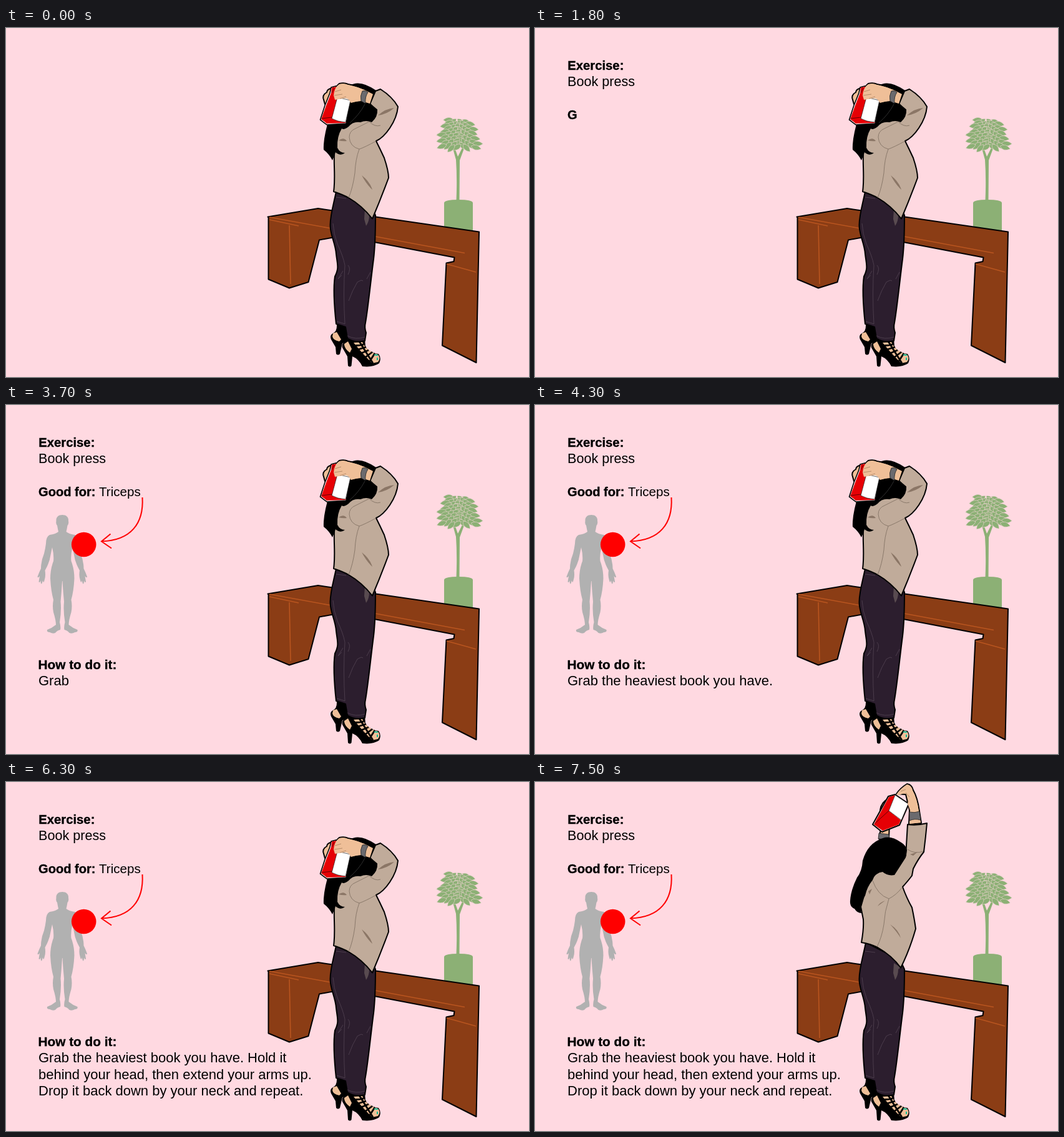
Animation of 838x559 px, one loop 8 s. Source, as an HTML page:

```html
<!DOCTYPE html>
<html lang="en">
<head>
<meta charset="utf-8">
<title>Book press</title>
<style>
html,body{margin:0;width:100%;height:100%;overflow:hidden;background:#ffd9e1}
svg{display:block;width:100vw;height:100vh}
text{font-family:"Liberation Sans",Arial,sans-serif}
.bold{font-weight:700;stroke:#000;stroke-width:.35}
.ink{stroke:#000;stroke-width:2;stroke-linejoin:round}
.thin{fill:none;stroke:#7d6c5f;stroke-width:.8}
.fold{fill:#8b7666}
.skin{fill:#efbf98}
.shirt{fill:#c0ab9a}
.red{fill:#e60005}
.watch{fill:#6b6a6e;stroke:#222;stroke-width:.8}
</style>
</head>
<body>
<svg viewBox="0 0 838 559">
<defs>
  <path id="half" d="M91 176C83 176 80 180 80.500 186Q79.500 190 82 193Q83 199 84 203Q79 207 70 208Q64 211 64 222Q63 230 61 238Q56 250 56 262Q53 268 50.500 275Q51 278 54 274L52.500 283Q54 286 55.500 281Q55.500 288 57.500 286L59 281Q60 287 61.500 281Q64 274 62.500 265Q70 252 71.500 240L74 228Q77 240 76 250Q71 263 71 278Q72 298 76 312Q74 322 76 332Q80 345 80 352Q74 357 66 360Q65 364 70 364Q75 367 79 365Q82 361 87 360Q88 355 86 348Q89 330 87.500 315Q89 300 90 282H91Z"/>
  <g id="base">
    <path class="ink" fill="#8b3d15" d="M419.500 302.500L500 289L758 326.500L753.500 536L699 508.500L705.500 376.500L717.500 374L718.500 367.500L593 343.500L524 335.500L502 339.500L484.500 407L454 416.500L420.500 402.500V303Z"/>
    <path fill="none" stroke="#b9551f" stroke-width="1.600" d="M422 303L521 321M422 307L469 317M454 316L456 410M592 334L735 360.500M706 378L753 391"/>
    <path d="M530 470L545 475L548 502L539 505L535 522Q532 525 529 522L528 511L521 499Q518 492 524 489Q530 486 530 477Z"/>
    <path class="skin" d="M524 489L530 487L537 499L534 502Q524 500 523 494Z"/>
    <path d="M549 492L575 498L576 511Q583 520 597 522Q602 529 598 537Q588 544 571 542Q565 530 555 526L553.500 541Q551 544 548 541L547 526L539 512Q537 503 546 502Z"/>
    <path class="skin" d="M542 506L548 502L554 514L551 520Q542 514 542 506Z"/>
    <path class="skin" d="M557 504L571 503Q577 517 596 523Q601 529 596 535L587 537Q573 524 557 504Z"/>
    <path fill="none" stroke="#000" stroke-width="2.800" d="M559 509L573 507M564 515L577 511M569 521L581 516M575 528L587 519M582 535L591 521M566 502L588 537"/>
    <path fill="none" stroke="#12bd98" stroke-width="2" d="M590 523.500L596 524M595 528V532"/>
    <path class="ink" fill="#2c1e2e" d="M530 257C526 279 519.500 297 519.500 316C519.500 332 528 345 529 362C531 380 534 384 527 398C524 418 526 447 529 474L544 479L547 497Q560 505 575 501L577 488Q574 480 576 472C580 450 585 400 589 370C592 345 592 320 592 300L585 285Z"/>
    <path fill="none" stroke="#544453" stroke-width=".8" d="M524 313Q525 330 531 346Q540 365 543 380Q540 425 543 474M529 271L545 273M548 380Q553 385 548 395M540 389L532 402L538 396M549 437Q555 420 563 407L569 404L572 405M578 402L584 391M547 493Q560 500 575 495M530 470L543 474"/>
    <path fill="#594b50" d="M575 290L574 306L577 317Q582 310 582 300L586 297Z"/>
  </g>
</defs>

<g id="plant" fill="#8cb075">
  <path d="M702 280Q703 275 725 275Q747 275 748 280V327H702Z"/>
  <path d="M721.500 277Q723 240 721 211L716 193L719 192L724 206L731 192L734 193L727 212L726.500 277Z"/>
</g>

<g id="down">
  <use href="#base"/>
  <path class="ink shirt" d="M526 203C525 220 528 240 525 262Q540 267 549 272Q570 284 587 305.500Q600 275 613 240Q613 229 606 208Q600 195 593 181C607 175 626 150 628 126Q619 110 600 98L592 101L583 122L594 131L580 142L545 142L528 175Z"/>
  <path d="M551 92Q567 82 593 100L584 121L595 131Q596 142 586 151Q577 147 568 151Q556 149 549 158Q541 164 538 161Q530 174 531 192Q535 200 543 200Q536 206 528 199Q526 205 523 212Q518 202 509 195Q508 180 515 154L538 120Z"/>
  <path class="thin" d="M593 181Q575 191 566 194Q551 190 550 175Q550 165 560 161L582 150Q591 159 600 156M566 194Q560 210 559 232Q556 255 549 272"/>
  <path fill="none" stroke="#444" stroke-width=".7" d="M575 122Q566 139 551 152"/>
  <path class="fold" d="M570 236Q583 246 587 259Q578 251 570 236ZM596 140Q608 129 622 128Q611 138 596 140ZM533 180Q541 174 546 181Q540 182 533 180Z"/>
  <path class="ink skin" d="M523 96Q514 98 514 103Q507 107 508.500 113L511 122L524 112Z"/>
  <path class="ink skin" d="M524 108Q527 94 534 89Q542 87 548 90Q560 92 574 98L588 105L583 122L569 117L553 121L542 114Z"/>
  <path fill="#fff" stroke="#000" stroke-width="1.600" d="M521 95L529 93L552 115L545 153L514 155L503.500 147L511 124L519 104Z"/>
  <path class="red" d="M522 95.500L529 94L533 112L523 143L545 150L544 152L514 153L505 146L513 124L521 104Z"/>
  <path fill="#fff" stroke="#222" stroke-width=".7" d="M531 111L552 116L544 151Q531 150 522 145Z"/>
  <path fill="none" stroke="#400" stroke-width=".8" d="M506 145L522 143M526 96L522 104"/>
  <path class="skin" d="M525 108Q526 95 534 90Q542 88 548 91Q562 94 574 99L588 106L583 121L569 117L552 119Q548 111 540 113L527 115Z"/>
  <path fill="none" stroke="#9c7455" stroke-width=".7" d="M527 102L537 99M526 108L539 106M535 113L545 110"/>
  <path class="watch" d="M571 101Q575 99 580 103Q575 110 576 121L569 117Q567 109 571 101Z"/>
</g>

<g id="up">
  <use href="#base"/>
  <path class="ink skin" d="M566 27Q555 32 553 45L555 70L551 91L567 91L568 65L575 40Z"/>
  <path class="watch" d="M551 82L567 84L568 92L550 91Z"/>
  <path class="ink shirt" d="M597 68Q612 70 628 66Q626 88 623 112Q614 123 606 139L604 150Q598 158 589 168Q596 187 604 201Q608 220 610 235Q600 270 586 297.500Q572 278 549 265Q537 259 523 257Q527 235 526 220L522 200L535 155L557 140L572 146L594 118Z"/>
  <path d="M557 90Q570 85 587 97Q594 101 596 109L594 121Q585 135 576 149Q565 151 557 144Q545 145 541 157Q532 168 529 182Q520 194 523 210Q516 210 512 203Q504 200 505 190Q506 173 516 153Q524 143 525 126Q533 98 557 90Z"/>
  <path class="thin" d="M589 168Q579 181 567 187Q549 181 541 158M567 187Q560 208 559 228Q556 248 548 264M597 108Q609 116 622 111"/>
  <path class="fold" d="M569 228Q583 237 586 250Q580 240 569 228ZM549 199Q552 193 561 190Q554 195 549 199ZM534 175L540 171L536 180ZM601 116L613 112L606 118Z"/>
  <path class="ink skin" d="M579 19Q585 10 596 3Q604 4 606 13Q613 25 616 47L619 66L599 68L600 45L594 20Z"/>
  <path class="ink" fill="#fff" d="M541 68L566 23L577 20L599 35L584 69L556 80Z"/>
  <path class="red" d="M543 68L567 24L577 21L567 46L586 61L583 68L557 78Z"/>
  <path fill="#fff" stroke="#222" stroke-width=".7" d="M577 21L598 35L587 61L567 46Z"/>
  <path fill="none" stroke="#400" stroke-width=".8" d="M567 46L544 67"/>
  <path class="skin" d="M579 20Q585 11 596 4Q603 5 605 14Q612 27 615 47L618 65L600 67L601 45L597 35L599 25L594 17L583 21Z"/>
  <path fill="none" stroke="#9c7455" stroke-width=".7" d="M586 15L594 12M594 17L600 24"/>
  <path class="watch" d="M600 48Q608 50 616 47L618 61Q608 58 600 62Z"/>
</g>

<g id="target">
  <g fill="#b1b1b1"><use href="#half"/><use href="#half" transform="matrix(-1 0 0 1 180.500 0)"/></g>
  <circle cx="124.700" cy="223.500" r="19.800" fill="red"/>
  <path fill="none" stroke="red" stroke-width="2" d="M218.500 148C221 190 200 217 153 218.500M167.500 206.500L153 218.500L169 229.500"/>
</g>
<g id="copy"></g>
</svg>
<script>
const $ = id => document.getElementById(id);

function add(parent, tag, attrs) {
  const el = document.createElementNS("http://www.w3.org/2000/svg", tag);
  for (const k in attrs) el.setAttribute(k, attrs[k]);
  return parent.appendChild(el);
}

// Foliage: overlapping leaves fanned out over a dome
const leaves = 64;
for (let i = 0; i < leaves; i++) {
  const v = (i + .5) / leaves, u = (i * .618034) % 1 * 2 - 1;
  const x = 725 + u * (14 + 18 * Math.sqrt(v)), y = 150 + 44 * v - 3 * u * u;
  const tilt = (u < 0 ? 180 - 30 * (1 + u) : 30 * (1 - u)) + 30 * Math.sin(i * 2.4);
  add($("plant"), "path", {
    d: "M-8 0Q-1 -8 9 0Q-1 8 -8 0Z",
    stroke: "#ffd9e1", "stroke-width": .5,
    transform: `translate(${x} ${y}) rotate(${tilt})`
  });
}

// x, baseline, size, weight class, text, start tick, letters per tick, letters before it
const lines = [
  [52.2, 67, 20.3, "bold", "Exercise:", -.1, 1.2, 0],
  [52, 93, 21.6, "", "Book press", 7.9, 1.2, 0],
  [52, 146, 20.1, "bold", "Good for:", 16.4, 1.2, 0],
  [149, 146, 20.6, "", "Triceps", 16.4, 1.2, 10],
  [51.5, 422.5, 20.8, "bold", "How to do it:", 33.2, 4.8, 0],
  [52, 449, 22, "", "Grab the heaviest book you have. Hold it", 33.2, 4.8, 14],
  [52, 475.5, 22, "", "behind your head, then extend your arms up.", 33.2, 4.8, 55],
  [52, 502, 22, "", "Drop it back down by your neck and repeat.", 33.2, 4.8, 99]
].map(([x, y, size, cls, text, start, rate, skip]) => ({
  el: add($("copy"), "text", { x, y, "font-size": size, class: cls }),
  text, start, rate, skip
}));

function draw() {
  const tick = Math.floor(performance.now() % 8000 / 100);
  for (const { el, text, start, rate, skip } of lines) {
    const n = Math.floor(rate * (tick - start)) - skip;
    el.textContent = text.slice(0, Math.max(0, n));
  }
  $("target").style.opacity = tick < 34 ? 0 : 1;
  const mix = tick < 74 ? 0 : tick < 75 ? .5 : 1;
  $("down").style.opacity = 1 - mix;
  $("up").style.opacity = mix;
  requestAnimationFrame(draw);
}
draw();
</script>
</body>
</html>
```
